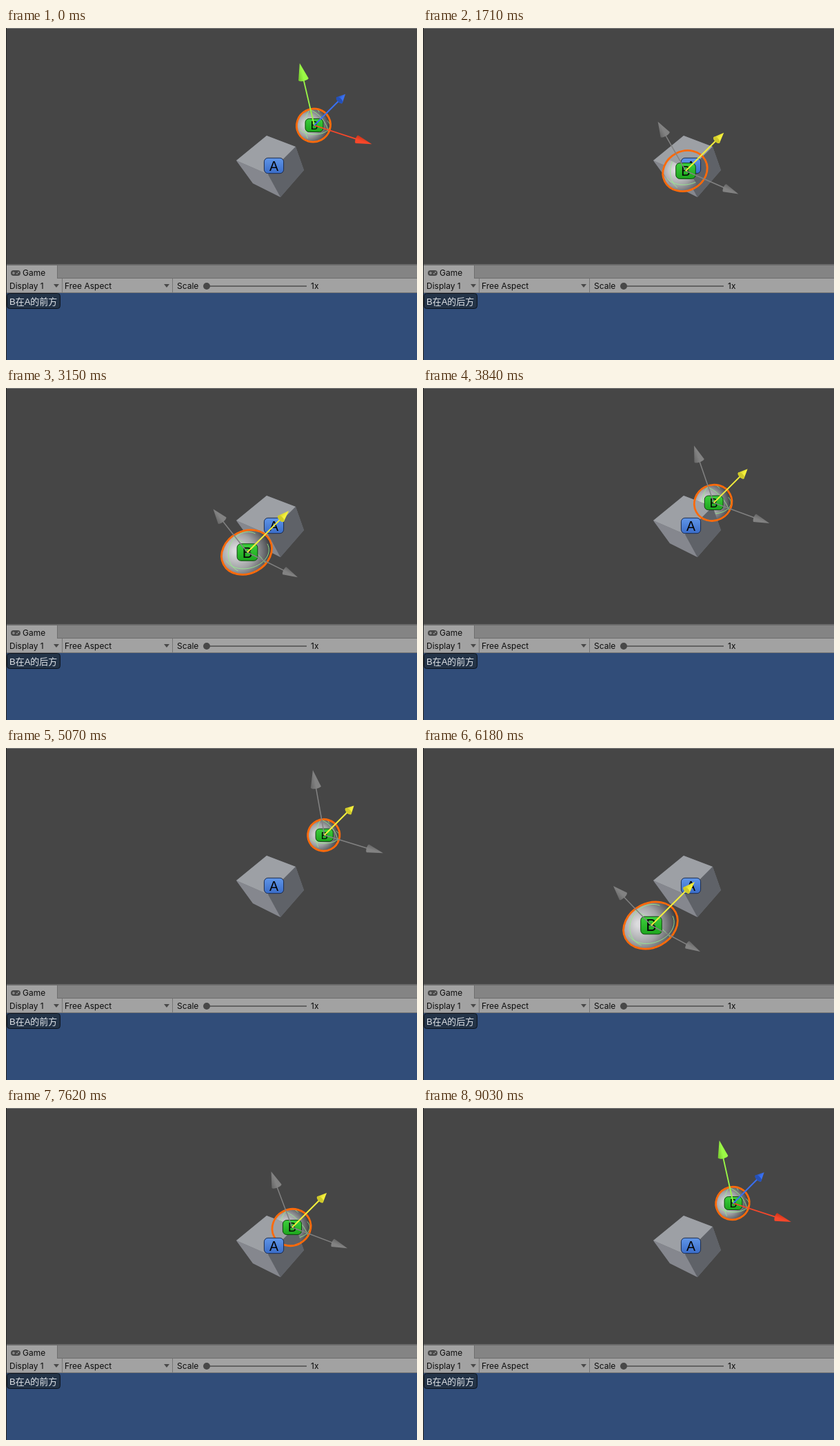
Write an HTML page with a canvas that moves like this. It is 596 px wide and 481 px high and loops after 9.15 s.

```html
<!DOCTYPE html>
<html lang="zh">
<head>
<meta charset="utf-8">
<title>Front or behind</title>
<style>
html, body { margin: 0; width: 100%; height: 100%; overflow: hidden; background: #464646; }
canvas { display: block; }
</style>
</head>
<body>
<canvas id="stage" width="596" height="481"></canvas>
<script>
const ctx = document.getElementById('stage').getContext('2d');
const LOOP = 9150, STEP = 30;
const UI_FONT = '12px Inter, sans-serif';
const ORIGIN = { x: 388, y: 200 };

// [time, x] of the ball; it slides along the line x + y = 588
const KEYS = [
  [0, 447], [1140, 447], [1710, 381], [2070, 353], [2550, 322],
  [2850, 322], [3150, 350], [3780, 415], [4260, 462],
  [5040, 462], [5970, 349], [6180, 331], [6750, 301],
  [7080, 301], [7620, 415], [7980, 450], [LOOP, 450]
];

const secant = i => (KEYS[i + 1][1] - KEYS[i][1]) / (KEYS[i + 1][0] - KEYS[i][0]);

function slope(i) {
  if (i === 0 || i === KEYS.length - 1) return 0;
  const a = secant(i - 1), b = secant(i);
  return a * b > 0 ? 2 * a * b / (a + b) : 0;
}

// Monotone cubic interpolation between the keys
function ballX(t) {
  let i = 0;
  while (i < KEYS.length - 2 && t >= KEYS[i + 1][0]) i++;
  const [t0, x0] = KEYS[i], [t1, x1] = KEYS[i + 1];
  const h = t1 - t0, u = (t - t0) / h, v = 1 - u;
  return x0 * (1 + 2 * u) * v * v + x1 * (3 - 2 * u) * u * u
    + h * u * v * (slope(i) * v - slope(i + 1) * u);
}

function rect(x, y, w, h, color) {
  ctx.fillStyle = color;
  ctx.fillRect(x, y, w, h);
}

function poly(points, color) {
  ctx.beginPath();
  points.forEach(p => ctx.lineTo(p[0], p[1]));
  ctx.closePath();
  ctx.fillStyle = color;
  ctx.fill();
}

function text(str, x, y, color = '#0c0c0c', font = UI_FONT) {
  ctx.font = font;
  ctx.fillStyle = color;
  ctx.fillText(str, x, y);
}

function dot(x, y, r, color) {
  ctx.beginPath();
  ctx.arc(x, y, r, 0, 7);
  ctx.fillStyle = color;
  ctx.fill();
}

function roundBox(x, y, w, h, r, fill, stroke) {
  ctx.beginPath();
  ctx.roundRect(x, y, w, h, r);
  ctx.fillStyle = fill;
  ctx.fill();
  ctx.strokeStyle = stroke;
  ctx.lineWidth = 1;
  ctx.stroke();
}

function drawCube() {
  const left = [334, 192], top = [378, 156], right = [420, 172], mid = [380, 212];
  const low = [398, 245], lowLeft = [358, 225], lowRight = [432, 206];
  poly([left, top, right, lowRight, low, lowLeft], '#72757b');
  poly([left, top, right, mid], '#9da0a5');
  poly([left, mid, low, lowLeft], '#85878e');
  poly([mid, right, lowRight, low], '#5f6268');
}

// Screen size, outline and axes of the ball at a given x
function makeBall(x) {
  const d = x - 331;
  return {
    x, y: 588 - x, d,
    a: 41 - 0.17 * d + 0.00026 * d * d,
    b: 32 - 0.07 * d,
    unit: 0.36 - 0.00095 * d,
    right: [71 + 0.108 * d, 38 - 0.092 * d],
    up: [-55 + 0.292 * d, -57 - 0.285 * d],
    ahead: [63 - 0.154 * d, -63 + 0.154 * d]
  };
}

function ballPath(ball) {
  ctx.beginPath();
  ctx.ellipse(ball.x - 1, ball.y, ball.a, ball.b, -0.48, 0, Math.PI * 2);
}

// Visible halves of the three great circles
function drawWires(ball) {
  const axes = [ball.right, ball.up, ball.ahead], view = [0.58, 0.75, -0.31];
  ctx.strokeStyle = 'rgba(150,240,140,.85)';
  ctx.lineWidth = 1;
  for (let i = 0; i < 3; i++) {
    const j = (i + 1) % 3;
    const start = Math.atan2(view[j], view[i]) - Math.PI / 2;
    ctx.beginPath();
    for (let k = 0; k <= 24; k++) {
      const c = Math.cos(start + k * Math.PI / 24) * ball.unit;
      const s = Math.sin(start + k * Math.PI / 24) * ball.unit;
      ctx.lineTo(ball.x - 1 + c * axes[i][0] + s * axes[j][0],
                 ball.y + c * axes[i][1] + s * axes[j][1]);
    }
    ctx.stroke();
  }
}

function drawBall(ball) {
  const { x, y, a } = ball;
  ctx.save();
  ballPath(ball);
  ctx.clip();
  const g = ctx.createRadialGradient(x - a * 0.42, y - a * 0.05, a * 0.1, x - a * 0.3, y, a * 1.35);
  g.addColorStop(0, '#dcdcde');
  g.addColorStop(0.45, '#a2a3a6');
  g.addColorStop(0.8, '#55565a');
  g.addColorStop(1, '#1c1d1f');
  ctx.fillStyle = g;
  ctx.fillRect(x - 60, y - 60, 120, 120);
  drawWires(ball);
  ctx.restore();
}

// The part of the ball that has come out of the cube's near face
function drawCap(ball) {
  const out = (392 - ball.x) / 38;
  if (out <= 0) return;
  ctx.save();
  if (out < 1) {
    const { right, up, ahead } = ball, m = ball.unit;
    ctx.beginPath();
    for (let i = 0; i <= 16; i++) {
      const s = 1 - 2 * out * i / 16, r = Math.sqrt(1 - s * s) * m * 1.08;
      for (let k = 0; k < 32; k++) {
        const c = Math.cos(k * Math.PI / 16) * r, n = Math.sin(k * Math.PI / 16) * r;
        const px = ball.x - 1 - s * m * ahead[0] + c * right[0] + n * up[0];
        const py = ball.y - s * m * ahead[1] + c * right[1] + n * up[1];
        k ? ctx.lineTo(px, py) : ctx.moveTo(px, py);
      }
      ctx.closePath();
    }
    ctx.clip();
  }
  drawBall(ball);
  ctx.restore();
}

function drawLabel(letter, x, y, d, light, dark, edge) {
  const w = 30.5 - 0.04 * d, h = 25.5 - 0.055 * d;
  const g = ctx.createLinearGradient(0, y - h / 2, 0, y + h / 2);
  g.addColorStop(0, light);
  g.addColorStop(1, dark);
  roundBox(x - w / 2, y - h / 2, w, h, 5.5, g, edge);
  ctx.textAlign = 'center';
  const size = 23 - 0.06 * d;
  text(letter, x, y + size * 0.36, '#050505', size + 'px "Liberation Sans", Arial, sans-serif');
  ctx.textAlign = 'left';
}

function drawArrow(ball, [dx, dy], neck, half, depth, [light, dark], width, showBase) {
  const len = Math.hypot(dx, dy), angle = Math.atan2(dy, dx), base = len * neck;
  ctx.save();
  ctx.translate(ball.x, ball.y);
  ctx.rotate(angle);
  ctx.strokeStyle = light;
  ctx.lineWidth = width;
  ctx.beginPath();
  ctx.moveTo(0, 0);
  ctx.lineTo(base, 0);
  ctx.stroke();
  const g = ctx.createLinearGradient(0, -half, 0, half);
  g.addColorStop(0, dark);
  g.addColorStop(0.55, light);
  g.addColorStop(1, light);
  ctx.fillStyle = g;
  ctx.beginPath();
  ctx.moveTo(len, 0);
  ctx.lineTo(base, half);
  ctx.ellipse(base, 0, depth, half, 0, Math.PI / 2, Math.PI * 1.5);
  ctx.closePath();
  ctx.fill();
  if (showBase) {
    ctx.fillStyle = dark;
    ctx.beginPath();
    ctx.ellipse(base, 0, depth, half, 0, 0, Math.PI * 2);
    ctx.fill();
  }
  ctx.restore();
}

function drawGizmo(ball, t) {
  const drag = t >= 960 && t < 8130;
  const grey = ['#828282', '#666666'];
  const ahead = drag ? ['#f5f03c', '#cfc92a']
    : t >= 450 && t < 960 ? ['#c9c890', '#a3a270'] : ['#3a70f0', '#2450b8'];
  const thin = drag ? 1.5 : 1.8;
  drawArrow(ball, ball.up, 0.74, 7.5, 2.5, drag ? grey : ['#9bfa46', '#74c22e'], thin);
  drawArrow(ball, ball.right, 0.74, 6, 2, drag ? grey : ['#f8472a', '#c83318'], thin);
  drawArrow(ball, ball.ahead, 0.81, 6, 3, ahead, 2, true);
}

function drawScene(t, ball) {
  rect(0, 0, 596, 343, '#464646');
  drawBall(ball);
  drawCube();
  drawCap(ball);

  ballPath(ball);
  ctx.strokeStyle = '#ff6a0a';
  ctx.lineWidth = 2.8;
  ctx.stroke();

  const labels = [
    () => drawLabel('A', ORIGIN.x + 0.5, ORIGIN.y - 0.5, 57, '#6096e8', '#3a6cc8', '#1c2c4c'),
    () => drawLabel('B', ball.x, ball.y, ball.d, '#3ccf3c', '#1da51d', '#0e450e')
  ];
  if (ball.x > ORIGIN.x) labels.reverse();
  labels.forEach(draw => draw());
  drawGizmo(ball, t);
}

function drawPanel(inFront) {
  rect(0, 0, 596, 1, '#7a7a7a');
  rect(0, 342, 596, 2, '#6a6a6a');
  rect(0, 344, 596, 19, '#848484');
  rect(1, 344, 73, 19, '#a2a2a2');
  rect(74, 344, 1, 19, '#6e6e6e');
  rect(74, 362, 522, 1, '#6e6e6e');
  rect(0, 363, 596, 20, '#a2a2a2');
  rect(0, 383, 596, 1, '#777777');
  rect(81, 363, 1, 20, '#777777');
  rect(241, 363, 1, 20, '#777777');

  // Gamepad icon
  ctx.beginPath();
  ctx.roundRect(7, 351, 14, 8, 4);
  ctx.fillStyle = '#484848';
  ctx.fill();
  rect(9, 354.5, 4, 1, '#a2a2a2');
  rect(10.5, 353, 1, 4, '#a2a2a2');
  dot(16, 356, 0.9, '#a2a2a2');
  dot(18, 354, 0.9, '#a2a2a2');

  text('Game', 24, 359);
  text('Display 1', 5, 378);
  text('Free Aspect', 85, 378);
  text('Scale', 248, 378);
  text('1x', 442, 378);
  for (const x of [73, 233]) poly([[x - 4, 371], [x + 4, 371], [x, 376]], '#4a4a4a');
  rect(291, 373, 145, 2, '#626262');
  dot(291, 374, 5, '#484848');

  rect(0, 384, 596, 97, '#314d79');
  roundBox(1.5, 384.5, 77, 22, 4, '#233347', '#0d141e');
  text('B在A的' + (inFront ? '前' : '后') + '方', 5, 400.5, '#dfe3e8',
    '13px "Liberation Sans", "Noto Sans CJK SC", "Noto Sans CJK", sans-serif');
  rect(0, 0, 1, 481, '#262626');
}

function frame(now) {
  const t = Math.floor((now % LOOP) / STEP) * STEP;
  const ball = makeBall(ballX(t));
  drawScene(t, ball);
  drawPanel(ball.x > ORIGIN.x);
  requestAnimationFrame(frame);
}

requestAnimationFrame(frame);
</script>
</body>
</html>
```
